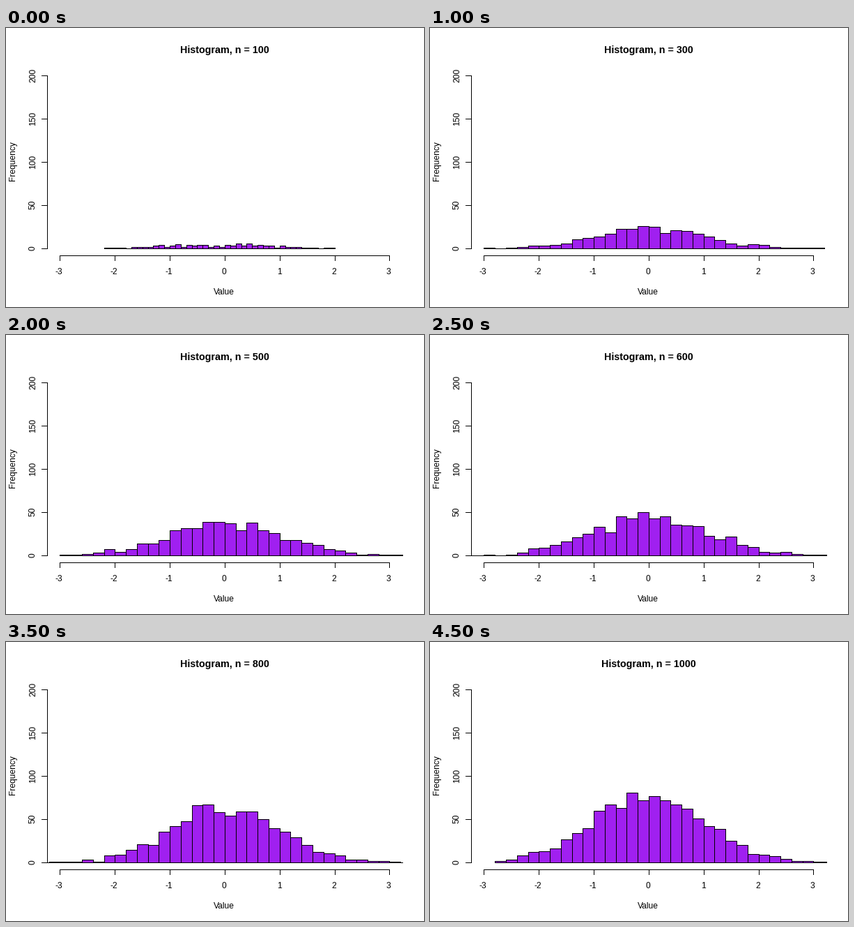
These frames come from a looping animation (600x400 px, 5000 ms). A matplotlib script:

```python
import math

import matplotlib.pyplot as plt
import numpy as np
from matplotlib.animation import FuncAnimation
from matplotlib.patches import Rectangle

W, H, DPI = 600, 400, 100
PX = 72 / DPI  # one pixel in points
LEFT, RIGHT = 59, 570  # plot region, used for clipping the bars
PURPLE = "#A020F0"

# Lowest and highest bin edge of each sample, for n = 100, 200, ... 1000
SPANS = [(-2.2, 2.0), (-2.8, 3.2), (-3.0, 3.2), (-3.2, 2.6), (-3.0, 3.4),
         (-3.6, 3.4), (-3.4, 3.6), (-3.6, 3.6), (-3.0, 3.6), (-2.8, 3.4)]

plt.rcParams["font.family"] = "Liberation Sans"
fig = plt.figure(figsize=(W / DPI, H / DPI), dpi=DPI, facecolor="white")
ax = fig.add_axes([0, 0, 1, 1])
ax.set(xlim=(0, W), ylim=(H, 0))
ax.axis("off")


def px(value):
    return math.floor(314.4 + 78.815 * value + 1e-6)


def py(count):
    return math.floor(316.65 - 1.23852 * count)


def line(x0, y0, x1, y1):
    ax.plot([x0 + 0.5, x1 + 0.5], [y0 + 0.5, y1 + 0.5], color="black",
            lw=PX, solid_capstyle="projecting", snap=False)


def label(x, y, text, size=12, **kw):
    return ax.text(x, y, text, size=size * PX, ha="center", va="baseline",
                   rotation_mode="anchor", **kw)


def histogram(n):
    """Bin edges and counts: a normal curve with seeded sampling noise."""
    start, stop = SPANS[n // 100 - 1]
    width = 0.1 if n == 100 else 0.2
    edges = np.linspace(start, stop, round((stop - start) / width) + 1)
    mid = edges[:-1] + width / 2
    mean = n * width * np.exp(-mid ** 2 / 2) / math.sqrt(2 * math.pi)
    noise = np.random.default_rng(n).normal(size=mid.size)
    counts = np.rint(mean + 0.6 * noise * np.sqrt(mean)).clip(0)
    counts[[0, -1]] = counts[[0, -1]].clip(1)  # the span ends at real values
    return edges, counts


# Axes
line(px(-3), 326, px(3), 326)
for v in range(-3, 4):
    line(px(v), 326, px(v), 333)
    label(px(v) - 0.8, 353, str(v))
line(59, py(200), 59, py(0))
for c in range(0, 201, 50):
    line(51, py(c), 59, py(c))
    label(42, py(c) - 0.5, str(c), rotation=90)

label(313, 382, "Value")
label(13, 190.8, "Frequency", rotation=90)
title = label(314, 36, "", size=14.3, weight="bold")

clip = Rectangle((LEFT, 0), RIGHT - LEFT, H, transform=ax.transData)
parts = []


def fill(x0, y0, x1, y1, color):
    box = Rectangle((x0, y0), x1 - x0, y1 - y0, fc=color, lw=0, zorder=3)
    ax.add_patch(box)
    box.set_clip_path(clip)
    parts.append(box)


def draw(frame):
    n = 100 * (frame + 1)
    title.set_text(f"Histogram, n = {n}")
    while parts:
        parts.pop().remove()
    edges, counts = histogram(n)
    base = py(0)
    for left, right, count in zip(edges, edges[1:], counts):
        x0, x1, top = px(left), px(right), py(count)
        fill(x0, top, x1 + 1, base + 1, "black")
        if base - top > 1:
            fill(x0 + 1, top + 1, x1, base, PURPLE)
    return [title, *parts]


anim = FuncAnimation(fig, draw, frames=10, interval=500,
                     init_func=lambda: draw(0), repeat=True, repeat_delay=0)
plt.show()
```
